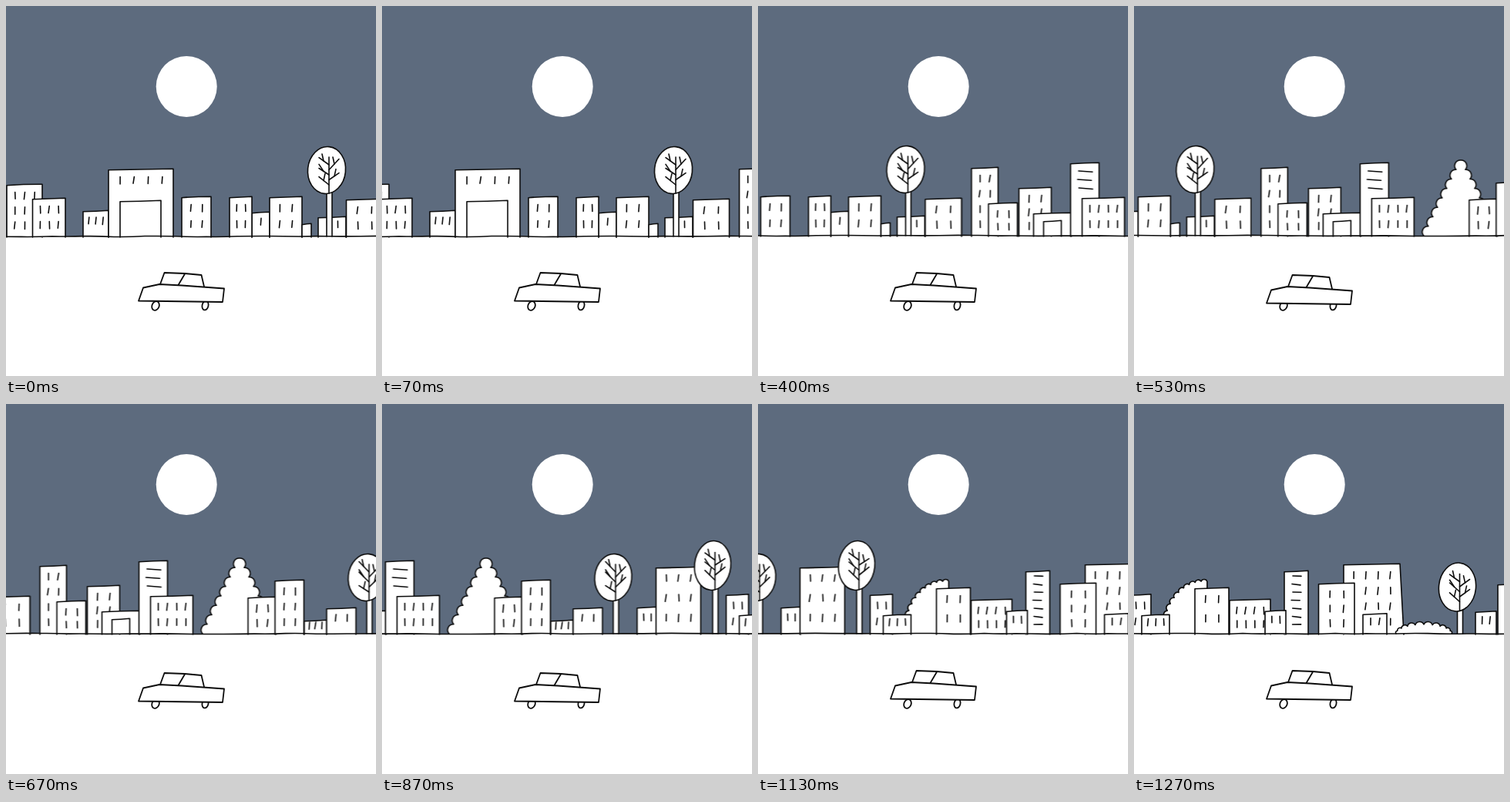
Animation, 480 px wide and 480 px high, one loop 1340 ms. Source, as an HTML page:

```html
<!DOCTYPE html>
<html lang="en">
<head>
<meta charset="utf-8">
<title>Night drive</title>
<style>
html, body { margin: 0; width: 100%; height: 100%; overflow: hidden; background: #fff; }
svg { display: block; width: 100%; height: 100%; }
path, ellipse { stroke: #0c0c0c; stroke-linecap: round; stroke-linejoin: round; }
#town path, #town ellipse { stroke-width: 1.6; }
#car path, #car ellipse { stroke-width: 1.8; }
</style>
</head>
<body>
<svg viewBox="0 0 480 480">
  <rect width="480" height="480" fill="#5d6b7e"/>
  <circle cx="234.2" cy="104.5" r="39.5" fill="#fff"/>
  <g id="town"><rect x="-20" y="298" width="1700" height="200" fill="#fff"/></g>
  <g id="car" fill="#fff">
    <ellipse cx="194" cy="389" rx="4.6" ry="6" transform="rotate(24 194 389)"/>
    <ellipse cx="258.5" cy="388.5" rx="4" ry="6" transform="rotate(12 258.5 388.5)"/>
    <g id="body">
      <path d="M200 361L205.500 346L232 347L253.500 349L257 364"/>
      <path d="M172 382.500L178 365.500L199 361L228 362.500L283 366.500L281 384L172 382.500Z"/>
      <path d="M223.500 362L232 347.500" fill="none"/>
    </g>
  </g>
</svg>
<script>
const town = document.getElementById('town');
const BASE = 298;

let seed = 7;
const rnd = a => {
  seed = (seed * 16807) % 2147483647;
  return (seed / 2147483647 * 2 - 1) * a;
};

function add(tag, attrs) {
  const el = document.createElementNS('http://www.w3.org/2000/svg', tag);
  for (const k in attrs) el.setAttribute(k, attrs[k]);
  town.append(el);
}
const ink = (d, fill = 'none') => add('path', { d, fill });
const dash = (x, y, dx, dy) => ink(`M${x} ${y}l${dx} ${dy}`);

// Windows fill an even grid; the row count follows from the height
function house(x, top, w, cols = 0, { rows, lean = 0 } = {}) {
  const h = BASE - top;
  ink(`M${x} ${BASE + 1}L${x} ${top + .7}` +
      `Q${x + w / 2} ${top + rnd(.8)} ${x + w} ${top - .7}L${x + w + lean} ${BASE + 1}`, '#fff');
  rows ??= Math.max(1, Math.round((h - 8) / 20));
  for (let r = 0; r < rows; r++)
    for (let c = 0; c < cols; c++) {
      const wx = x + w * (c + .8) / (cols + .6);
      const wy = top + Math.min(14, h * .38) + r * (h - 9) / rows;
      dash(wx + .5, wy - 4.5, rnd(1) - .5, 9 + rnd(.6));
    }
}

function bars(x, y, w, gap, n) {
  for (let i = 0; i < n; i++) dash(x + rnd(1), y + i * gap, w, rnd(1) + .5);
}

function tree(cx, cy, rx, ry) {
  ink(`M${cx} ${BASE}V${cy + ry - 3}h7V${BASE}`, '#fff');
  add('ellipse', { cx, cy, rx, ry, fill: '#fff', transform: `rotate(6 ${cx} ${cy})` });
  const x = cx + 3;
  dash(x, cy - 17, 0, ry + 16);
  // Forked twigs, left and right by turns
  for (let i = 0; i < 5; i++) {
    const side = i % 2 ? 1 : -1;
    const y = cy + 19 - i * 6.5;
    const up = 11 + rnd(3);
    dash(x, y, side * 13, -up);
    dash(x + side * 7, y - up * .54, side * (i % 3 - .5) * 4, -9);
  }
}

// Leafy edge: n round lobes along the curve at(0..1) = [x, y]
function leaves(n, at) {
  let [px, py] = at(0);
  let d = `M${px} ${py}`;
  for (let i = 1; i <= n; i++) {
    const [x, y] = at(i / n);
    const r = Math.hypot(x - px, y - py) * .54;
    d += `A${r} ${r} 0 0 1 ${x} ${y}`;
    [px, py] = [x, y];
  }
  ink(d + `V${BASE}`, '#fff');
}

const cone = (cx, top, half) => u => {
  const s = 2 * u - 1;
  return [cx + s * half, BASE - (BASE - top) * (1 - Math.abs(s))];
};
const dome = (cx, rx, ry, sweep) => u => {
  const a = Math.PI * (1 - u * sweep);
  return [cx + rx * Math.cos(a), BASE - ry * Math.sin(a)];
};

house(1, 231, 46, 3);
house(34.5, 249, 42.500, 3);
house(100, 265, 33, 3);
house(133, 211, 84, 4, { rows: 1 });
house(148, 252, 53);
house(228, 247, 38, 2);
house(319, 267, 23, 1);
house(290, 247, 29, 2);
house(342, 247, 42, 2);
house(384, 282, 12);
house(405, 273, 36, 2);
tree(416, 212, 24.5, 30.5);
house(441.500, 250, 47, 2);

house(501.500, 210, 34.500, 2);
house(523.500, 256, 37.500, 2);
house(563, 236, 42, 2);
house(582, 269, 49);
house(595, 279, 23);
house(630, 204, 37);
bars(640, 214, 18, 11, 3);
house(645, 249, 55, 4);

leaves(16, cone(760.500, 200, 48));
house(771.500, 251, 36.500, 2);
house(806.500, 229, 37.500, 2);
house(844.500, 281, 29, 3);
house(873.500, 265, 38, 2);
tree(925.500, 225, 24, 30.5);

house(956.500, 264, 25.500, 2);
house(981, 212, 58, 3, { rows: 3 });
tree(1054.500, 209.500, 23.5, 32);
house(1072, 247.500, 29, 2);
leaves(11, dome(1169, 52, 68, .53));
house(1089, 274, 36, 3);
house(1203, 254, 53, 4);
house(1158, 239, 44, 2, { rows: 2 });
house(1274, 217, 31);
bars(1284, 223, 11, 10.5, 7);
house(1249, 268.500, 27, 2);

house(1351, 208, 73, 4, { lean: 5 });
house(1318.500, 233, 46.500, 2);
house(1376, 272.500, 31, 2);
leaves(10, dome(1455, 36, 12, 1));
tree(1498.500, 237.500, 24, 31.5);
house(1522, 269.500, 27, 2);
house(1551, 234, 49, 2);

let road = `M-20 ${BASE}`;
for (let x = 20; x <= 1660; x += 40) road += `Q${x - 20} ${BASE + rnd(.9)} ${x} ${BASE + rnd(.5)}`;
ink(road);

const LOOP = 1340;
const steps = [0, 70, 130, 200, 330, 400, 470, 530, 670, 800, 870, 930, 1000, 1130, 1270];
// time and distance at the key points of the drive
const route = [[0, 0], [200, 108.5], [400, 224.5], [670, 457.5],
  [870, 625.5], [1000, 785], [1270, 1079]];

function distance(t) {
  const i = Math.max(1, route.findIndex(r => r[0] >= t));
  const [[t0, x0], [t1, x1]] = route.slice(i - 1, i + 1);
  return x0 + (x1 - x0) * (t - t0) / (t1 - t0);
}

function play(el, times, pose) {
  const frames = times.map(t => ({ offset: t / LOOP, transform: pose(t), easing: 'steps(1, end)' }));
  frames.push({ ...frames[frames.length - 1], offset: 1 });
  el.animate(frames, { duration: LOOP, iterations: Infinity });
}

play(town, steps, t => `translate(${-distance(t)}px, ${t < 200 ? 1 : 0}px)`);
play(document.getElementById('body'), [0, 530, 1000],
  t => `translate(0px, ${t === 530 ? 3 : 0}px)`);
</script>
</body>
</html>
```
